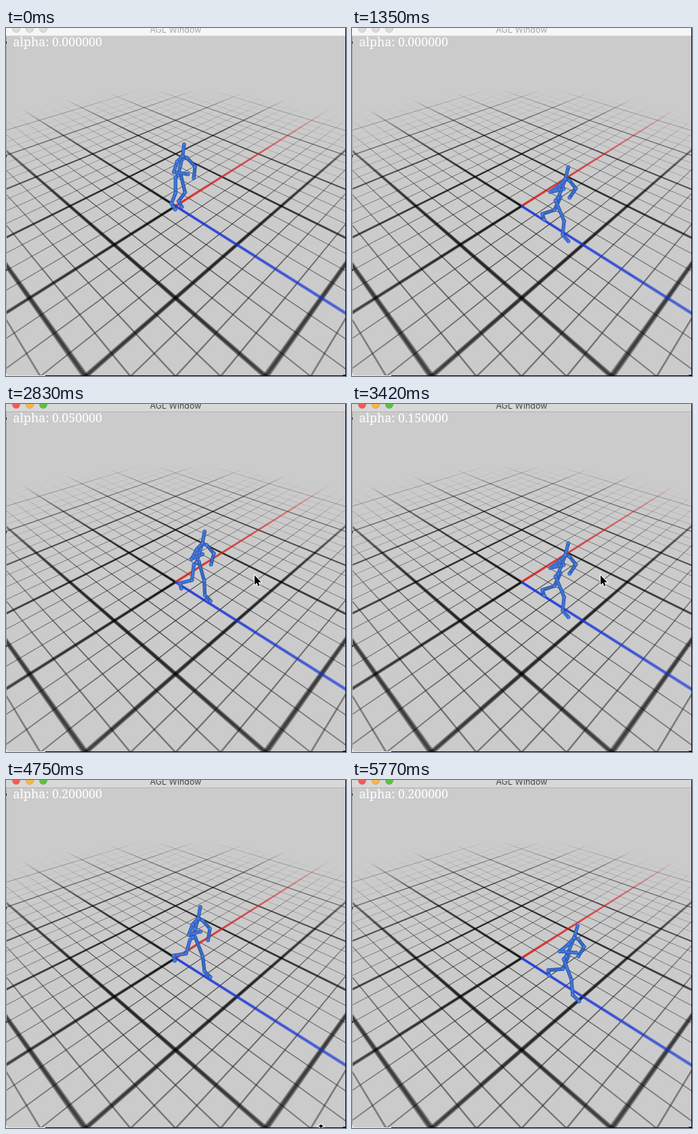
These frames come from a looping animation (502x514 px, 5870 ms). An HTML page with a canvas:

```html
<!DOCTYPE html>
<html lang="en">
<head>
<meta charset="utf-8">
<title>Figure on a grid</title>
<style>
  html, body { margin: 0; width: 100%; height: 100%; overflow: hidden; background: #cbcbcb; }
  canvas { display: block; width: 502px; height: 514px; }
</style>
</head>
<body>
<canvas id="stage" width="502" height="514"></canvas>
<script>
const W = 502, H = 514, LOOP = 5870, STEP = 147.9, CYCLE = 14;
const ctx = document.getElementById('stage').getContext('2d');

// Camera looking at the grid origin. Units are bold cells:
// a runs along the red axis, b along the blue axis, h is height.
const CAM = { x: 250.3, y: 263, f: 438.7, unit: 0.1778, sin: 0.63, cos: 0.776 };
const REACH = 4.85, NEAR = 4.7;

function project(a, b, h = 0) {
  const u = (a + b) * CAM.unit, v = (a - b) * CAM.unit, up = h * CAM.unit;
  const k = CAM.f / (1 + CAM.cos * v - CAM.sin * up);
  return [CAM.x + u * k, CAM.y - (v * CAM.sin + up * CAM.cos) * k];
}

const fade = (a, b) => Math.max(0, 1 - Math.pow(Math.hypot(a, b) / REACH, 1.1));

// A strip on the ground, tapered by perspective and fading with distance.
function strip(g, at, from, to, half, rgb, strength) {
  const [x0, y0] = project(...at(from, 0)), [x1, y1] = project(...at(to, 0));
  const length = Math.hypot(x1 - x0, y1 - y0);
  const paint = g.createLinearGradient(x0, y0, x1, y1);
  for (let i = 0; i <= 20; i++) {
    const p = at(from + (to - from) * i / 20, 0);
    const [x, y] = project(...p);
    const stop = Math.min(1, Math.hypot(x - x0, y - y0) / length);
    paint.addColorStop(stop, `rgba(${rgb},${strength * fade(...p)})`);
  }
  g.fillStyle = paint;
  g.beginPath();
  for (const [t, side] of [[from, -half], [to, -half], [to, half], [from, half]]) {
    g.lineTo(...project(...at(t, side)));
  }
  g.fill();
}

// Bold lines get soft edges from stacked strips.
function boldStrip(g, at, from, to, rgb) {
  for (const half of [0.023, 0.016, 0.009]) strip(g, at, from, to, half, rgb, 0.55);
}

const thinStrip = (g, at, from, to) => strip(g, at, from, to, 0.0065, '30,30,30', 0.8);

function drawGrid(g) {
  for (const bold of [false, true]) {
    const paint = bold ? boldStrip : thinStrip;
    for (let i = -19; i <= 19; i++) {
      if ((i % 4 === 0) !== bold) continue;
      const c = i / 4, span = Math.sqrt(REACH * REACH - c * c);
      const blueEnd = i ? Math.min(span, c + NEAR) : 0;
      const redStart = Math.max(-span, c - NEAR), redEnd = i ? span : 0;
      if (blueEnd > -span) paint(g, (t, d) => [c + d, t], -span, blueEnd, '0,0,0');
      if (redEnd > redStart) paint(g, (t, d) => [t, c + d], redStart, redEnd, '0,0,0');
    }
  }
  boldStrip(g, (t, d) => [t, d], 0, REACH, '210,30,30');
  boldStrip(g, (t, d) => [d, t], 0, NEAR, '15,45,215');
}

function makeBackdrop() {
  const layer = document.createElement('canvas');
  layer.width = W;
  layer.height = H;
  const g = layer.getContext('2d');
  g.fillStyle = '#e4e4e4';
  g.fillRect(0, 0, W, H);
  g.fillStyle = '#0c0c0c';
  g.fillRect(58, 512, W - 58, 2);
  g.fillRect(501, 0, 1, H);

  g.save();
  g.beginPath();
  g.roundRect(0.5, -20, 500.5, 533, 5);
  g.fillStyle = '#cbcbcb';
  g.fill();
  g.clip();
  drawGrid(g);
  g.restore();

  g.fillStyle = '#a9a9a9';
  g.fillRect(0, 11, 1, 498);
  g.fillStyle = '#111';
  for (let y = 20; y < H; y += 168) g.fillRect(0, y, 1, 3);
  return layer;
}

function drawTitleBar(active) {
  ctx.fillStyle = active ? '#d8d8d8' : '#f6f6f6';
  ctx.fillRect(0, 0, 501, 11);
  ctx.fillStyle = active ? '#b4b4b4' : '#dadada';
  ctx.fillRect(0, 11, 501, 1);
  const lights = active ? ['#f95a52', '#fab740', '#58c440'] : Array(3).fill('#dcdcdc');
  ctx.strokeStyle = 'rgba(0,0,0,.14)';
  ctx.lineWidth = 1;
  lights.forEach((fill, i) => {
    ctx.beginPath();
    ctx.arc(15 + 20 * i, 1, 5.6, 0, 7);
    ctx.fillStyle = fill;
    ctx.fill();
    ctx.stroke();
  });
  ctx.font = '12.5px Inter, "Liberation Sans", sans-serif';
  ctx.textAlign = 'center';
  ctx.fillStyle = active ? '#484848' : '#a8a8a8';
  ctx.fillText('AGL Window', 250.5, 6.5);
}

function drawAlpha(n) {
  const level = Math.floor((n - 12.5) / 3.5);
  const alpha = 0.05 * Math.max(0, Math.min(4, level));
  ctx.font = '17.8px "Noto Serif", serif';
  ctx.textAlign = 'left';
  ctx.fillStyle = '#fff';
  ctx.fillText('alpha: ' + alpha.toFixed(6), 10.5, 27);
}

// Cosine over the stride, peaking at the given step.
const wave = (phase, peak) => Math.cos((phase - peak) * 2 * Math.PI / CYCLE);

const shift = ([a, b, h], da, db, dh) => [a + da, b + db, h + dh];

// Next joint of a chain: 0 degrees hangs down, 90 points forward.
function bone(joint, length, degrees, out = 0) {
  const r = degrees * Math.PI / 180;
  return shift(joint, out, length * Math.sin(r), -length * Math.cos(r));
}

function leg(hip, side, phase) {
  const thigh = 7 + 20 * wave(phase, 9.7);
  const shank = -18 + 27 * wave(phase, 10.8);
  const top = shift(hip, side * 0.045, 0, -0.02);
  const knee = bone(top, 0.34, thigh);
  const ankle = bone(knee, 0.31, shank);
  return [hip, top, knee, ankle, bone(ankle, 0.11, shank + 55)];
}

// The near arm is bent at the elbow, the far arm is held out and hangs.
function nearArm(neck, phase) {
  const shoulder = shift(neck, -0.09, 0, -0.05);
  const elbow = bone(shoulder, 0.24, -19 + 10 * wave(phase, 2));
  return [neck, shoulder, elbow, bone(elbow, 0.25, 130 + 15 * wave(phase, 6.5))];
}

function farArm(neck, phase) {
  const shoulder = shift(neck, 0.08, 0, -0.08);
  const elbow = bone(shoulder, 0.26, 0, 0.15);
  return [neck, shoulder, elbow, bone(elbow, 0.25, -8 + 8 * wave(phase, 2))];
}

function line(points) {
  ctx.beginPath();
  points.forEach(p => ctx.lineTo(...p));
  ctx.stroke();
}

function limb(joints, fill) {
  const points = joints.map(j => project(...j));
  ctx.lineCap = ctx.lineJoin = 'round';
  ctx.strokeStyle = '#2a4c8c';
  ctx.lineWidth = 5.2;
  line(points);
  ctx.strokeStyle = fill;
  ctx.lineWidth = 3.7;
  line(points);
  ctx.fillStyle = '#4680ee';
  ctx.strokeStyle = '#2a509a';
  ctx.lineWidth = 0.7;
  for (const [x, y] of points) {
    ctx.beginPath();
    ctx.arc(x, y, 2.6, 0, 7);
    ctx.fill();
    ctx.stroke();
  }
}

function drawFigure(phase) {
  const bounce = 0.045 * wave(2 * phase, 0) + 0.035 * wave(phase, CYCLE / 4);
  const hip = [0.01, 0.035 + 0.0605 * phase, 0.67 + bounce];
  const waist = shift(hip, 0, 0.035, 0.2);
  const neck = shift(hip, 0, 0.07, 0.41);
  const head = shift(neck, 0, 0.02, 0.22);
  const far = '#386aca', near = '#3f74dc';
  limb(leg(hip, 1, phase + CYCLE / 2), far);
  limb(farArm(neck, phase), far);
  limb([head, neck, waist, hip], near);
  limb(leg(hip, -1, phase), near);
  limb(nearArm(neck, phase), near);
}

function shape(points, x, y) {
  ctx.beginPath();
  points.forEach(([px, py]) => ctx.lineTo(x + px, y + py));
  ctx.closePath();
  ctx.lineJoin = 'miter';
  ctx.strokeStyle = '#fff';
  ctx.lineWidth = 2;
  ctx.stroke();
  ctx.fillStyle = '#000';
  ctx.fill();
}

const ARROW = [[0, 0], [0, 14], [3.2, 11], [5.4, 16], [7.6, 15], [5.5, 10.2], [9.8, 10.2]];
const RESIZE = [[0, -4], [4, -0.5], [1, -0.5], [1, 2], [-1, 2], [-1, -0.5], [-4, -0.5]];

// The pointer eases in, rests, leaves downwards and turns into a resize mark.
function drawPointer(n) {
  if (n < 12 || n > 32) return;
  if (n === 32) return shape(RESIZE, 465, 512.5);
  const arrive = Math.max(0, (15 - n) / 3) ** 2;
  const leave = Math.max(0, (n - 28) / 3);
  shape(ARROW, 367 + 99 * arrive + 71 * leave, 253 + 63 * arrive + 238 * leave);
}

const backdrop = makeBackdrop();
const start = performance.now();

function draw(now) {
  const time = Math.max(0, now - start) % LOOP;
  const n = Math.min(39, Math.floor(time / STEP));
  ctx.drawImage(backdrop, 0, 0);
  drawTitleBar(n >= 15);
  drawAlpha(n);
  drawFigure(n % CYCLE);
  drawPointer(n);
  requestAnimationFrame(draw);
}
draw(start);
</script>
</body>
</html>
```
